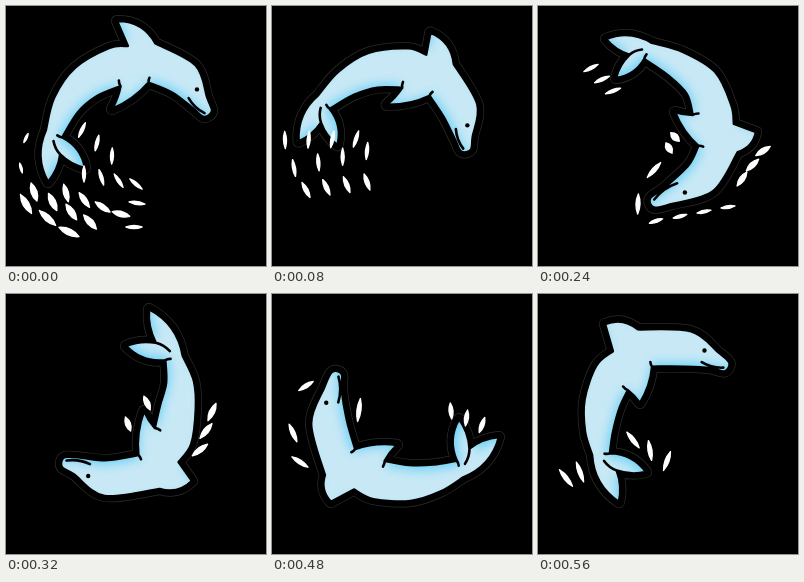
These frames come from a looping animation (260 px wide and 260 px high, 640 ms). An HTML page:

```html
<!DOCTYPE html>
<html lang="en">
<head>
<meta charset="utf-8">
<title>Leaping dolphin</title>
<style>
  html, body { margin: 0; width: 100%; height: 100%; overflow: hidden; background: #000; }
  svg { display: block; width: 100vw; height: 100vh; }
  .pose { visibility: hidden; animation: show 640ms step-end infinite; animation-delay: calc(var(--i) * 80ms - 640ms); }
  @keyframes show {
    0% { visibility: visible; }
    12.5%, 100% { visibility: hidden; }
  }
  path { stroke-linejoin: round; stroke-linecap: round; }
  .halo { fill: none; stroke: #2c2c2c; stroke-width: 12; }
  .rim { stroke: #000; stroke-width: 10.6; }
  .skin { fill: #6ad0f7; }
  .light { fill: #c8e8f5; filter: blur(5px); }
  .ink { fill: none; stroke: #000; stroke-width: 2.6; }
  .drop { fill: #fff; stroke: #fff; stroke-width: 1.4; }
</style>
</head>
<body>
<svg id="stage" viewBox="0 0 260 260"></svg>
<script>
const CENTRE = [120, 115];
const HALF_WIDTHS = [9, 14, 18, 20, 20, 18, 9, 5];  // from tail to snout

const mix = (a, b, t) => a.map((v, k) => v + (b[k] - v) * t);
const points = text => text.split(' ').map(pair => pair.split(',').map(Number));

// spine: eight points from tail to snout. fins: tips of dorsal fin, flipper, inner and outer fluke.
// sprays: [count, first place, last place, first and last angle, length, width].
const pose = (spine, fins, ...sprays) => ({ spine: points(spine), fins: points(fins), sprays });

// Half-way pose: the average of two, pushed outwards to stay on the circle.
function between(a, b, ...sprays) {
  const blend = key => a[key].map((p, i) => mix(CENTRE, mix(p, b[key][i], 0.5), 1.08));
  return { spine: blend('spine'), fins: blend('fins'), sprays };
}

const leap = pose('48,128 60,99 80,76 109,61 146,57 178,73 194,97 202,108', '111,15 106,103 79,162 42,176',
  [2, [20, 132], [15, 162], [115, 75], 10, 2],
  [3, [20, 198], [63, 226], [60, 25], 22, 6],
  [4, [28, 186], [84, 216], [72, 48], 19, 6],
  [4, [60, 187], [115, 208], [75, 15], 18, 5],
  [4, [78, 168], [130, 178], [90, 40], 16, 3],
  [3, [76, 124], [106, 150], [115, 92], 16, 3],
  [2, [131, 197], [128, 221], [8, 0], 16, 3]);

const dive = pose('66,67 95,61 125,60 155,71 186,97 189,138 179,165 175,177', '200,51 124,97 60,113 25,92',
  [3, [11, 103], [40, 122], [88, 105], 17, 3],
  [3, [23, 145], [71, 122], [90, 118], 17, 3],
  [3, [152, 156], [140, 178], [45, 30], 20, 6],
  [1, [178, 195], [178, 195], [0, 0], 15, 5],
  [3, [203, 156], [205, 184], [132, 145], 18, 5]);

const plunge = pose('110,45 138,58 163,77 174,104 180,143 163,172 130,190 114,197', '218,126 137,106 78,72 68,33',
  [3, [53, 62], [75, 85], [-27, -20], 16, 3],
  [2, [137, 131], [131, 142], [45, 60], 12, 6],
  [2, [116, 164], [100, 198], [-48, -88], 20, 4],
  [4, [118, 215], [190, 201], [-18, -8], 14, 3],
  [3, [204, 173], [225, 145], [-55, -32], 17, 5]);

const roll = pose('168,64 174,88 172,113 167,142 143,178 100,184 71,172 57,168', '186,187 138,117 120,52 143,15',
  [2, [141, 109], [122, 130], [65, 70], 15, 5],
  [3, [206, 118], [194, 156], [-65, -37], 19, 5]);

const rise = pose('188,175 165,184 138,189 107,186 68,168 57,128 61,95 65,79', '59,208 125,151 187,125 227,143',
  [1, [34, 92], [34, 92], [-32, 0], 17, 4],
  [2, [21, 139], [28, 168], [66, 33], 19, 4],
  [1, [87, 116], [87, 116], [97, 0], 23, 4],
  [3, [179, 117], [210, 131], [85, 110], 16, 4]);

const upright = pose('63,160 61,138 64,110 74,84 107,54 150,55 176,66 189,73', '67,30 102,109 108,178 81,208',
  [3, [95, 146], [129, 167], [52, 110], 20, 4],
  [2, [28, 184], [42, 178], [52, 70], 21, 4]);

const poses = [
  leap,
  between(leap, dive,
    [4, [13, 134], [84, 133], [88, 108], 17, 3],
    [4, [22, 162], [95, 145], [80, 95], 17, 3],
    [4, [34, 184], [95, 176], [62, 70], 17, 4]),
  dive, plunge, roll,
  between(roll, rise,
    [2, [28, 122], [32, 160], [-63, 60], 18, 4],
    [3, [165, 75], [221, 137], [60, -48], 17, 4]),
  rise, upright
];

const stage = document.getElementById('stage');

function add(parent, tag, attrs) {
  const node = document.createElementNS('http://www.w3.org/2000/svg', tag);
  for (const key in attrs) node.setAttribute(key, attrs[key]);
  return parent.appendChild(node);
}

// Point at station t; side 1 is the back, -1 the belly, 0 the spine.
function at(spine, t, side) {
  const place = i => {
    const [x1, y1] = spine[Math.max(i - 1, 0)];
    const [x2, y2] = spine[Math.min(i + 1, spine.length - 1)];
    const reach = side * HALF_WIDTHS[i] / Math.hypot(x2 - x1, y2 - y1);
    return [spine[i][0] + (y2 - y1) * reach, spine[i][1] - (x2 - x1) * reach];
  };
  return mix(place(Math.floor(t)), place(Math.ceil(t)), t % 1);
}

// Catmull-Rom curve, continuing from its first point.
function smooth(list) {
  return list.slice(1).map((q, i) => {
    const p = list[i], before = list[i - 1] || p, after = list[i + 2] || q;
    const c1 = p.map((v, k) => v + (q[k] - before[k]) / 6);
    const c2 = q.map((v, k) => v - (after[k] - p[k]) / 6);
    return `C${c1} ${c2} ${q}`;
  }).join('');
}

// Single arc from a to b, bulging to the left of its direction.
function bow(a, b, bulge) {
  const [x, y] = mix(a, b, 0.5);
  return `Q${x + (b[1] - a[1]) * bulge},${y - (b[0] - a[0]) * bulge} ${b}`;
}

function dolphin({ spine, fins: [dorsal, flipper, innerFluke, outerFluke] }) {
  const on = (t, side) => at(spine, t, side);
  const back = [0, 1, 2, 3, 3.4].map(t => on(t, 1));
  const head = [...[4, 5, 6, 7].map(t => on(t, 1)), ...[7, 6, 5, 4].map(t => on(t, -1))];
  const belly = [3, 2, 1, 0].map(t => on(t, -1));
  const notch = mix(spine[0], mix(innerFluke, outerFluke, 0.5), 0.5);

  const outline = 'M' + back[0] + smooth(back)
    + bow(back[4], dorsal, 0) + bow(dorsal, head[0], 0.3)
    + smooth(head)
    + bow(head[7], flipper, 0.12) + bow(flipper, belly[0], -0.08)
    + smooth(belly)
    + bow(belly[3], innerFluke, 0.25) + bow(innerFluke, notch, 0.15)
    + bow(notch, outerFluke, 0.15) + bow(outerFluke, back[0], 0.25) + 'Z';

  const folds = [
    [notch, mix(notch, on(0, 0.6), 0.6)],
    [belly[3], on(0, -0.4)],
    [belly[0], on(3, -0.7)],
    [head[7], on(4, -0.75)],
    [on(6.8, -0.4), on(5.6, -0.55)]
  ].map(([a, b]) => 'M' + a + bow(a, b, 0.15)).join('');

  return { outline, folds, eye: mix(on(5.58, 0), on(5.58, 1), 0.4) };
}

function drops([count, first, last, angles, length, width]) {
  let d = '';
  for (let i = 0; i < count; i++) {
    const t = count > 1 ? i / (count - 1) : 0;
    const [x, y] = mix(first, last, t);
    const angle = (angles[0] + (angles[1] - angles[0]) * t) * Math.PI / 180;
    const dx = Math.cos(angle) * length / 2, dy = Math.sin(angle) * length / 2;
    const a = [x - dx, y - dy], b = [x + dx, y + dy];
    d += 'M' + a + bow(a, b, width / length) + bow(b, a, width / length);
  }
  return d;
}

poses.forEach((item, i) => {
  const { outline, folds, eye: [cx, cy] } = dolphin(item);
  const group = add(stage, 'g', { class: 'pose', style: `--i:${i}` });
  for (const layer of ['halo', 'rim', 'skin']) add(group, 'path', { class: layer, d: outline });

  // The lit copy is enlarged around the curl, which leaves the belly blue.
  add(add(group, 'clipPath', { id: 'clip' + i }), 'path', { d: outline });
  const lit = add(group, 'g', { 'clip-path': `url(#clip${i})` });
  const [x, y] = CENTRE;
  add(lit, 'path', { class: 'light', d: outline, transform: `translate(${x} ${y}) scale(1.08) translate(${-x} ${-y})` });

  add(group, 'path', { class: 'ink', d: outline + folds });
  add(group, 'circle', { cx, cy, r: 2.2 });
  add(group, 'path', { class: 'drop', d: item.sprays.map(drops).join('') });
});
</script>
</body>
</html>
```
